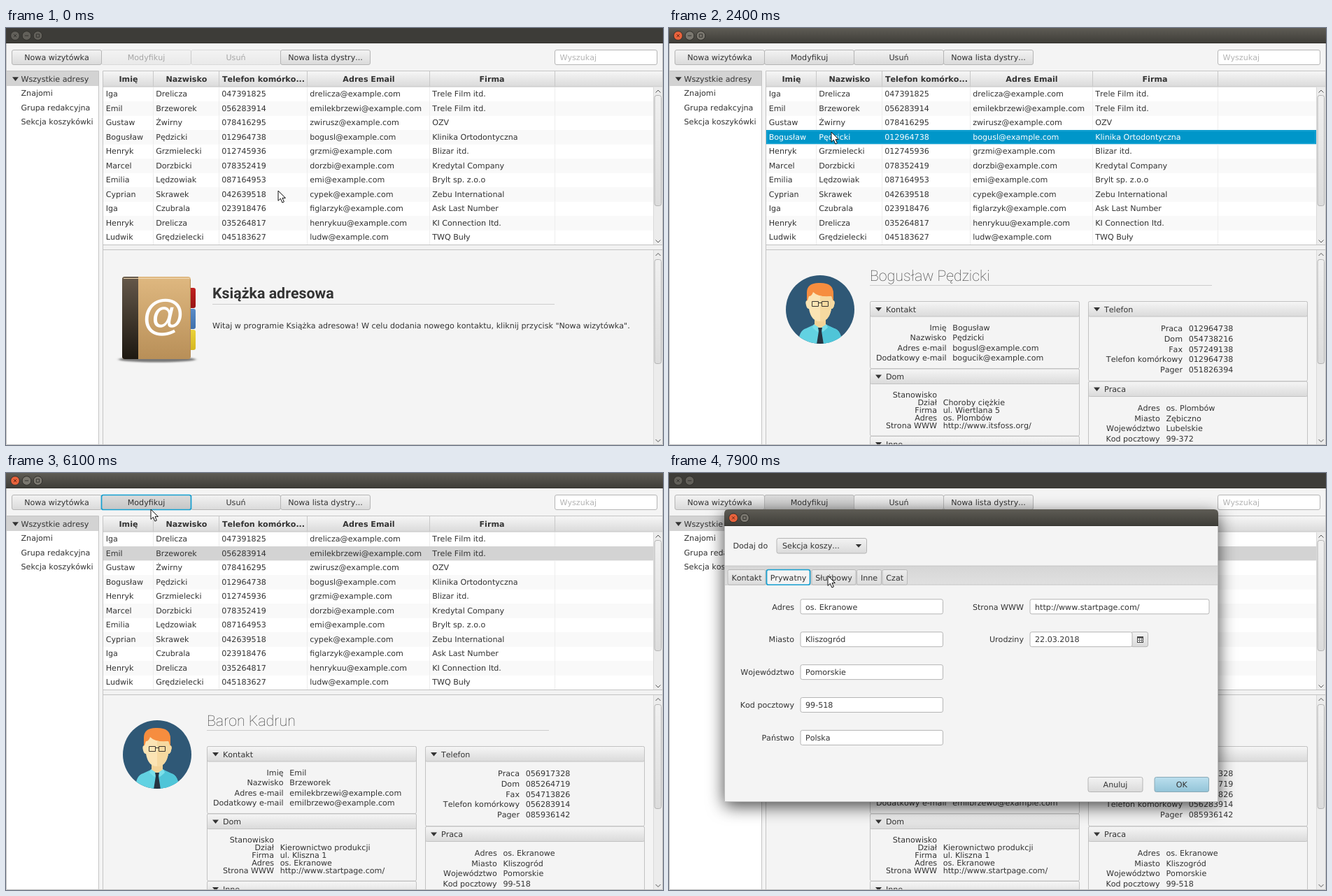
An HTML page that plays this animation: 939 px wide and 597 px high, repeating every 8000 ms.

```html
<!DOCTYPE html>
<html lang="pl">
<head>
<meta charset="utf-8">
<title>Książka adresowa</title>
<style>
html, body { margin: 0; width: 100%; height: 100%; overflow: hidden; background: #f4f4f4; }
svg { display: block; width: 939px; height: 597px; }
text { font: 11.12px "DejaVu Sans", sans-serif; font-kerning: none; fill: #333; white-space: pre; text-rendering: geometricPrecision; }
.mid { text-anchor: middle; }
.end { text-anchor: end; }
.bold { font-weight: bold; }
.dim { fill: #b4b4b4; }
.white { fill: #fff; }
.heading { font: bold 21.35px Roboto, sans-serif; font-kerning: none; }
.name { font: 100 21.35px Roboto, sans-serif; font-kerning: none; }
.at { font: bold 61px "Liberation Sans", sans-serif; fill: #fff; text-anchor: middle; }
.shadow { filter: drop-shadow(0 6px 12px rgba(0, 0, 0, .72)); }
</style>
</head>
<body>
<svg viewBox="0 0 939 597">
  <defs></defs>
  <g id="scene"></g>
  <path id="cursor" d="M0 0V14.3L3.4 11.2 5.9 17 8.4 15.9 6 10.4H10.4Z" fill="#fff" stroke="#111" stroke-linejoin="round"/>
</svg>
<script>
const LOOP = 8000, STEP = 100;
const ROW_TOP = 84.5, ROW_H = 20.5;

const gradients = {
  title: ['#5e5c55', '#3d3c37'], button: ['#f3f3f3', '#dadada'], pressed: ['#dcdcdc', '#c5c5c5'],
  header: ['#f6f6f6', '#dadada'], tab: ['#ececec', '#dcdcdc'], ok: ['#bbdfee', '#93c4d8'],
  thumb: ['#f0f0f0', '#dcdcdc'], spine: ['#65584a', '#1d1811'], cover: ['#dfb880', '#b88f58'],
  strip: ['#d6d6d6', '#e0e0e0'], red: ['#c02020', '#981414'], blue: ['#5a8cc8', '#3f70ac'], yellow: ['#ead23a', '#d6b820'],
};
document.querySelector('defs').innerHTML = Object.entries(gradients).map(([id, [from, to]]) =>
  `<linearGradient id="${id}" x2="0" y2="1"><stop stop-color="${from}"/><stop offset="1" stop-color="${to}"/></linearGradient>`).join('')
  + '<clipPath id="disc"><circle cx="216" cy="403" r="49"/></clipPath>'
  + '<filter id="soft"><feGaussianBlur stdDeviation="2 1"/></filter>';

const columns = [
  [139, 'Imię', 175], [210.5, 'Nazwisko', 258], [304.5, 'Telefon komórko...', 368],
  [430.5, 'Adres Email', 518.5], [605.5, 'Firma', 694.5], [784.5, '', 0],
];
const contacts = [
  ['Iga', 'Drelicza', '047391825', 'drelicza@example.com', 'Trele Film itd.'],
  ['Emil', 'Brzeworek', '056283914', 'emilekbrzewi@example.com', 'Trele Film itd.'],
  ['Gustaw', 'Żwirny', '078416295', 'zwirusz@example.com', 'OZV'],
  ['Bogusław', 'Pędzicki', '012964738', 'bogusl@example.com', 'Klinika Ortodontyczna'],
  ['Henryk', 'Grzmielecki', '012745936', 'grzmi@example.com', 'Blizar itd.'],
  ['Marcel', 'Dorzbicki', '078352419', 'dorzbi@example.com', 'Kredytal Company'],
  ['Emilia', 'Lędzowiak', '087164953', 'emi@example.com', 'Brylt sp. z.o.o'],
  ['Cyprian', 'Skrawek', '042639518', 'cypek@example.com', 'Zebu International'],
  ['Iga', 'Czubrala', '023918476', 'figlarzyk@example.com', 'Ask Last Number'],
  ['Henryk', 'Drelicza', '035264817', 'henrykuu@example.com', 'KI Connection Itd.'],
  ['Ludwik', 'Grędzielecki', '045183627', 'ludw@example.com', 'TWQ Buły'],
];
const details = {
  5: { title: 'Marcel Dorzbicki', mail2: 'dorzbik@example.com', phones: ['078352419', '064815327', '051738264', '036295184'],
       home: ['Księgowość', 'ul. Kredowa 3', 'os. Monetowe', 'http://www.example.com/'], work: ['os. Monetowe', 'Groszowiec', 'Opolskie', '99-264'] },
  3: { title: 'Bogusław Pędzicki', mail2: 'bogucik@example.com', phones: ['012964738', '054738216', '057249138', '051826394'],
       home: ['Choroby ciężkie', 'ul. Wiertlana 5', 'os. Plombów', 'http://www.itsfoss.org/'], work: ['os. Plombów', 'Zębiczno', 'Lubelskie', '99-372'] },
  2: { title: 'Gustaw Żwirny', mail2: 'zwirekg@example.com', phones: ['078416295', '043927516', '062819437', '017458362'],
       home: ['Ochrona', 'ul. Kamykowa 7', 'os. Piargowe', 'http://www.example.org/'], work: ['os. Piargowe', 'Żwirogród', 'Mazowieckie', '99-183'] },
  1: { title: 'Baron Kadrun', mail2: 'emilbrzewo@example.com', phones: ['056917328', '085264719', '054713826', '085936142'],
       home: ['Kierownictwo produkcji', 'ul. Kliszna 1', 'os. Ekranowe', 'http://www.startpage.com/'], work: ['os. Ekranowe', 'Kliszogród', 'Pomorskie', '99-518'] },
};

// Each move: start time, number of steps, end point.
const moves = [
  [300, 5, 258, 197], [1600, 4, 232, 149], [3000, 2, 235, 129], [4200, 2, 235, 110], [4700, 7, 178, 36],
  [6000, 2, 207, 52], [6200, 6, 213, 136], [6800, 2, 146, 143], [7000, 1, 182, 144], [7500, 5, 227, 147],
];
const rowSelections = [[1300, 5], [2400, 3], [3400, 2], [4300, 1]];
const detailChanges = [[1300, 5], [2400, 3], [3500, 2], [4400, 1]];
const latest = (changes, t) => changes.filter(c => c[0] <= t).pop()?.[1] ?? -1;

const text = (x, y, s, cls = '') => `<text x="${x}" y="${y}" class="${cls}">${s}</text>`;
const rect = (x, y, w, h, fill, extra = '') => `<rect x="${x}" y="${y}" width="${w}" height="${h}" fill="${fill}" ${extra}/>`;
const path = (d, fill, extra = '') => `<path d="${d}" fill="${fill}" ${extra}/>`;
const line = (d, color) => path(d, 'none', `stroke="${color}"`);
const box = (x, y, w, h, fill, border = '#b5b5b5', r = 2.5) =>
  rect(x + .5, y + .5, w - 1, h - 1, fill, `rx="${r}" stroke="${border}"`);
const ring = (x, y, w, h) => rect(x + .5, y + .5, w - 1, h - 1, 'none', 'rx="2.5" stroke="#149fd0" stroke-width="1.7"');
const triangle = (x, y) => path(`M${x - 4.5} ${y - 2.7}h9l-4.5 5.6z`, '#333');

function button(x, y, w, label, { fill = 'url(#button)', border, disabled, focus } = {}) {
  return `<g opacity="${disabled ? .4 : 1}">${box(x, y, w, 22, fill, border)}${text(x + w / 2, y + 15, label, 'mid')}</g>`
    + (focus ? ring(x, y, w, 22) : '');
}
const input = (x, cy, w, value, cls) => box(x, cy - 11, w, 22, '#fff') + text(x + 7.5, cy + 4.2, value, cls);
const field = (x, cy, w, label, value, cls) => text(x - 8.5, cy + 4.2, label, 'end') + input(x, cy, w, value, cls);

function windowButton(cx, cy, kind, active) {
  const orange = kind === 'close' && active;
  const ink = orange ? '#6b2413' : '#34332f';
  const glyph = {
    close: `M${cx - 2} ${cy - 2}l4 4m0-4l-4 4`, min: `M${cx - 2.7} ${cy}h5.4`, max: `M${cx - 2.2} ${cy - 2.2}h4.4v4.4h-4.4z`,
  }[kind];
  return `<circle cx="${cx}" cy="${cy}" r="6.4" fill="${orange ? '#e9633c' : active ? '#7b7870' : '#62605a'}" stroke="#302f2b"/>` + line(glyph, ink);
}

function scrollbar(top, bottom, thumbTop, thumbHeight) {
  return rect(925, top, 13, bottom - top, '#ececec') + line(`M925.5 ${top}V${bottom}`, '#d8d8d8')
    + box(926.5, thumbTop, 10.5, thumbHeight, 'url(#thumb)', '#b4b4b4', 3)
    + line(`M928.5 ${top + 8}l3.5-3.5 3.5 3.5M928.5 ${bottom - 7}l3.5 3.5 3.5-3.5`, '#555');
}

function mainWindow({ active, dialog, row, pressed, focus }) {
  const none = row < 0;
  return rect(0, 0, 939, 597, '#f4f4f4')
    + rect(0, 0, 939, 22, active ? 'url(#title)' : '#3d3c38') + line('M0 21.5H939', '#33322e')
    + windowButton(13, 11, 'close', active) + windowButton(29.5, 11, 'min', active)
    + (dialog ? '' : windowButton(45.5, 11, 'max', active))
    + button(8, 31, 129, 'Nowa wizytówka') + button(264, 31, 129, 'Usuń', { disabled: none })
    + button(392, 31, 129, 'Nowa lista dystry...')
    + button(136, 31, 129, 'Modyfikuj', { disabled: none, focus, fill: pressed ? 'url(#pressed)' : undefined })
    + input(784, 42, 147, 'Wyszukaj', 'dim')
    + rect(0, 62, 132, 535, '#fff') + rect(0, 62, 132, 21, '#d3d3d3') + triangle(13.5, 73)
    + ['Wszystkie adresy', 'Znajomi', 'Grupa redakcyjna', 'Sekcja koszykówki'].map((s, i) => text(21.5, 76.9 + ROW_H * i, s)).join('')
    + line('M0 61.5H132.5V597M138.5 597V61.5H939', '#c4c4c4');
}

function table({ row, pressed }) {
  const highlight = pressed ? '#d3d3d3' : '#0096c9';
  const rows = contacts.map((contact, i) => {
    const selected = i === row;
    const y = ROW_TOP + ROW_H * i;
    return rect(139, y, 786, ROW_H, selected ? highlight : i % 2 ? '#f9f9f9' : '#fff')
      + (selected ? '' : line(columns.slice(1).map(c => `M${c[0]} ${y}v${ROW_H}`).join(''), '#ededed'))
      + (selected && !pressed ? rect(140.3, y + 1.3, 783.4, ROW_H - 2.6, 'none', 'stroke="#22a9d8" stroke-width=".9"') : '')
      + contact.map((s, c) => text(columns[c][0] + 3.7, y + 13.7, s, selected && !pressed ? 'white' : '')).join('');
  }).join('');
  return rows + rect(139, 62, 799, 22, 'url(#header)') + line('M139 84H938', '#c4c4c4')
    + columns.map(([x, s, cx], i) => (i ? line(`M${x} 62V84`, '#c8c8c8') : '') + text(cx, 77.4, s, 'mid bold')).join('')
    + scrollbar(84.5, 310.5, 96, 159)
    + rect(139, 310, 800, 8, '#f2f2f2') + line('M139 310.5H939M139 317.5H939', '#c2c2c2');
}

function welcome() {
  return '<ellipse cx="216" cy="474.5" rx="55" ry="4" fill="#777" filter="url(#soft)"/>'
    + rect(258, 372, 13, 29, 'url(#red)', 'rx="3"') + rect(258, 402, 13, 29, 'url(#blue)', 'rx="3"')
    + rect(258, 432, 13, 29, 'url(#yellow)', 'rx="3"')
    + rect(166, 356, 98, 118, 'url(#cover)', 'rx="4"')
    + path('M189 356H170Q166 356 166 360V470Q166 474 170 474H189Z', 'url(#spine)')
    + line('M168 358.5H262', '#f1d9b4') + line('M263.5 360V471', '#b48b56')
    + text(225, 431, '@', 'at')
    + text(295, 387.3, 'Książka adresowa', 'heading') + line('M295 395.5H784', '#cdcdcd')
    + text(295, 429.6, 'Witaj w programie Książka adresowa! W celu dodania nowego kontaktu, kliknij przycisk "Nowa wizytówka".');
}

function avatar() {
  return '<circle cx="216" cy="403" r="49" fill="#2f5876"/><g clip-path="url(#disc)">'
    + path('M185 453Q185 433 196 430L209 424H223L236 430Q247 433 247 453Z', '#62d2e2')
    + path('M216 424H223L236 430Q247 433 247 453H216Z', '#4fc5d8')
    + path('M208 410H224V425L216 431 208 425Z', '#f3d397')
    + path('M207 424L216 430 225 424 227 429 220 435 216 430 212 435 205 429Z', '#7adfea')
    + path('M213 429H219L218 434 221 453H211L214 434Z', '#263442') + '</g>'
    + path('M197 393V379Q197 365 214 365Q235 364 235 380V393Z', '#f68d3f')
    + path('M198 390Q194 390 196 397Q197 402 200 402Q203 420 216 420Q229 420 232 402Q235 402 236 397Q238 390 234 390L232 384Q214 386 206 378Q204 384 200 384Z', '#fbe4b4')
    + path('M216 383.5Q224 385 232 384L234 390Q238 390 236 397Q235 402 232 402Q229 420 216 420Z', '#f6d9a0')
    + line('M204.5 391.5h9v7h-9zM218.5 391.5h9v7h-9zM213.5 393.5h5', '#3a3630');
}

const pane = (x, y, w, h, label) => box(x, y, w, h, '#f4f4f4', '#c2c2c2', 2) + box(x, y, w, 22.5, 'url(#header)', '#c2c2c2', 2)
  + triangle(x + 12.5, y + 11.7) + text(x + 23, y + 15.7, label);
const list = (x, y, step, labels, values) => labels.map((label, i) =>
  text(x, y + step * i, label, 'end') + text(x + 8.7, y + step * i, values[i])).join('');

function card(index) {
  const { title, mail2, phones, home, work } = details[index];
  const [first, last, mobile, mail] = contacts[index];
  const [office, house, fax, pager] = phones;
  return avatar() + text(287, 362.3, title, 'name') + line('M287 368.5H776', '#cdcdcd')
    + pane(287, 391, 300, 97, 'Kontakt')
    + list(396.6, 433, 14.3, ['Imię', 'Nazwisko', 'Adres e-mail', 'Dodatkowy e-mail'], [first, last, mail, mail2])
    + pane(287, 487.5, 300, 97, 'Dom')
    + list(383, 528.6, 11.2, ['Stanowisko', 'Dział', 'Firma', 'Adres', 'Strona WWW'], ['', ...home])
    + pane(287, 584, 300, 97, 'Inne')
    + pane(599, 391, 314, 115, 'Telefon')
    + list(734, 434, 14.75, ['Praca', 'Dom', 'Fax', 'Telefon komórkowy', 'Pager'], [office, house, fax, mobile, pager])
    + pane(599, 505.5, 314, 120, 'Praca')
    + list(701.7, 548, 14.6, ['Adres', 'Miasto', 'Województwo', 'Kod pocztowy'], work);
}

function contactTab() {
  const { title, mail2, phones: [office, house, fax, pager] } = details[1];
  const [first, last, mobile, mail] = contacts[1];
  const left = [['Imię', first], ['Nazwisko', last], ['Wyświetl jako', title], ['Pseudonim', 'Podaj pseudonim', 'dim'],
    ['E-Mail', mail], ['Dodatkowy E-mail', mail2]];
  const right = [['Praca', office], ['Dom', house], ['Fax', fax], ['Pager', pager], ['Telefon komórkowy', mobile]];
  return left.map((f, i) => field(205.5, 182 + 41 * i, 214, ...f)).join('')
    + right.map((f, i) => field(561.5, 182 + 41 * i, 212, ...f)).join('');
}

function privateTab() {
  const { home, work } = details[1];
  const labels = ['Adres', 'Miasto', 'Województwo', 'Kod pocztowy', 'Państwo'];
  return [...work, 'Polska'].map((s, i) => field(187.5, 191.3 + 46.9 * i, 204.5, labels[i], s)).join('')
    + field(515.5, 191.3, 257, 'Strona WWW', home[3])
    + box(660, 227.2, 25, 22, 'url(#button)') + field(515.5, 238.2, 147, 'Urodziny', '22.03.2018')
    + rect(669.5, 234.5, 8, 8, '#f4f4f4', 'stroke="#444"') + rect(669, 234, 9, 2.5, '#444')
    + line('M669 239.5h9M672.5 236v6M675.5 236v6', '#777');
}

function dialogWindow(tab) {
  const tabs = [['Kontakt', 83.5, 55], ['Prywatny', 138.5, 64], ['Służbowy', 203.5, 64], ['Inne', 268, 36], ['Czat', 304.5, 36.5]];
  return rect(79, 53, 706, 418, '#f4f4f4', 'class="shadow" rx="5"') + rect(79, 70, 706, 401, '#f4f4f4')
    + path('M79 76V58Q79 52 85 52H779Q785 52 785 58V76Z', 'url(#title)') + line('M79 75.5H785', '#33322e')
    + windowButton(92, 64.3, 'close', true) + windowButton(108, 64.3, 'max', true)
    + text(91.5, 108.3, 'Dodaj do') + box(153.5, 93, 129.5, 22.5, 'url(#button)')
    + (tab === 0 ? ring(153.5, 93, 129.5, 22.5) : '')
    + text(162, 108.3, 'Sekcja koszy...') + path('M266.8 102h8.4l-4.2 4.8z', '#333')
    + rect(79, 133, 706, 27, 'url(#strip)') + line('M79 133H785M79 160H785', '#c4c4c4')
    + tabs.map(([label, x, w], i) => box(x, 138, w, 22.5, i === tab ? '#f4f4f4' : 'url(#tab)', '#b9b9b9', 2)
      + (i === tab ? rect(x + 1, 159, w - 2, 2, '#f4f4f4') : '') + text(x + w / 2, 153.7, label, 'mid')).join('')
    + (tab === 1 ? ring(139, 138, 63, 22.5) : '')
    + [contactTab, privateTab][tab]()
    + button(598.5, 435, 79, 'Anuluj') + button(693.5, 435, 78.5, 'OK', { fill: 'url(#ok)', border: '#8aa9b6' })
    + line('M79.5 76V470.5H784.5V76', '#bdbdbd');
}

function scene(t) {
  const dialog = t >= 6300, pressed = t >= 5900;
  const state = { dialog, pressed, focus: pressed && !dialog, active: t >= 1200 && !dialog, row: latest(rowSelections, t) };
  const person = latest(detailChanges, t);
  return mainWindow(state) + table(state) + (person < 0 ? welcome() : card(person)) + scrollbar(318, 596, 331, 150)
    + line('M.5 22V596.5H938.5V22', '#c0c0c0') + (dialog ? dialogWindow(t >= 7400 ? 1 : 0) : '');
}

function cursorAt(t) {
  let x = 389, y = 233;
  for (const [start, steps, toX, toY] of moves) {
    if (t < start) break;
    const p = Math.min(1, ((t - start) / STEP + 1) / steps);
    const eased = p * p * (3 - 2 * p);
    x += (toX - x) * eased;
    y += (toY - y) * eased;
  }
  return [Math.round(x), Math.round(y)];
}

const sceneNode = document.getElementById('scene');
const cursorNode = document.getElementById('cursor');
let drawn = '';
function play() {
  const t = Math.floor(performance.now() % LOOP / STEP) * STEP;
  const markup = scene(t);
  if (markup !== drawn) sceneNode.innerHTML = drawn = markup;
  cursorNode.setAttribute('transform', `translate(${cursorAt(t)})`);
  requestAnimationFrame(play);
}
play();
</script>
</body>
</html>
```
